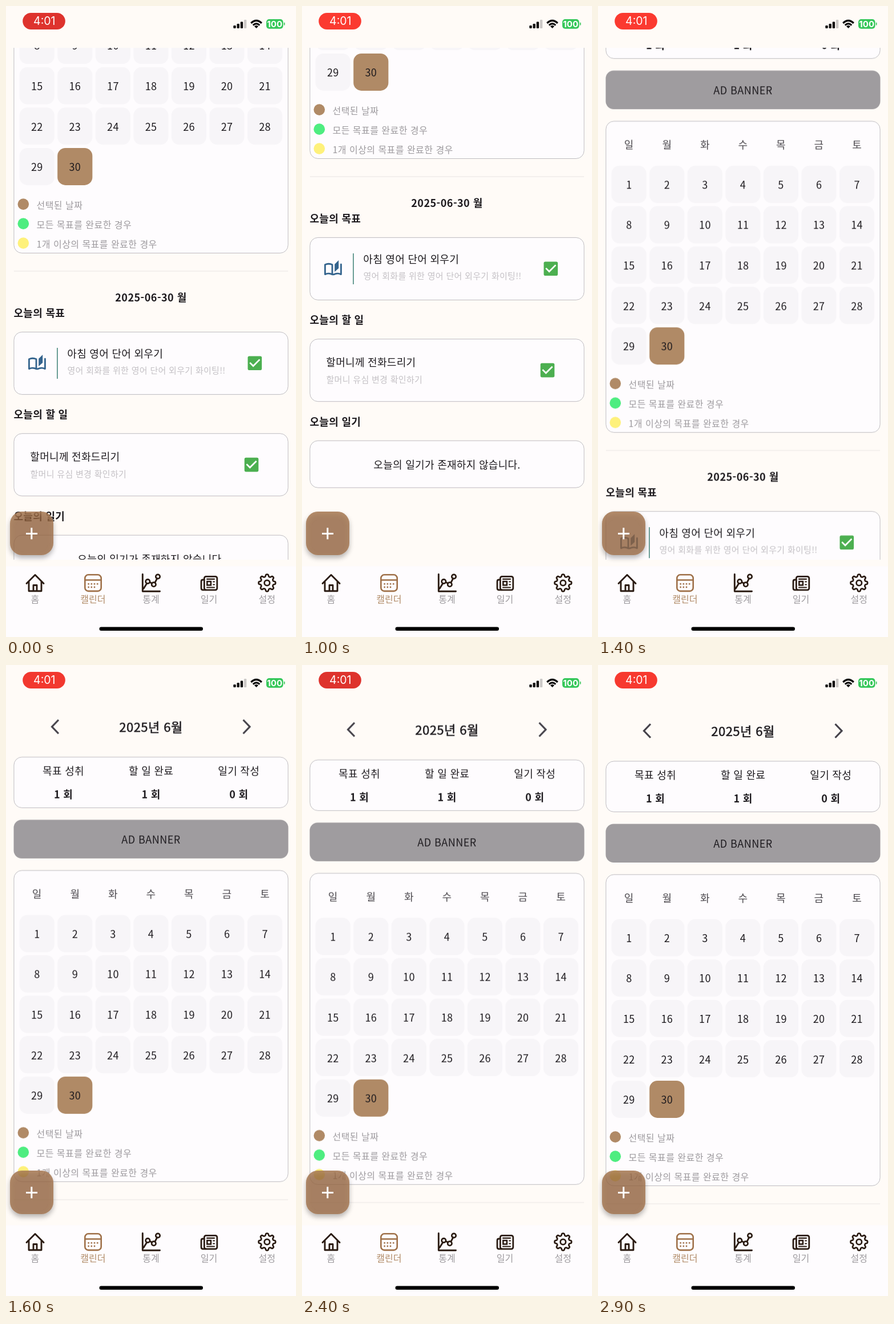
An HTML page that plays this animation: 508x1102 px, repeating every 3000 ms.

```html
<!DOCTYPE html>
<html lang="ko">
<head>
<meta charset="utf-8">
<title>Calendar</title>
<style>
  html, body { margin: 0; width: 100%; height: 100%; overflow: hidden; background: #fffbf7; }
  svg { display: block; width: 508px; height: 1102px; }
  text { font-family: "Noto Sans CJK KR", "Noto Sans CJK", sans-serif; white-space: pre; }
  .status { font-family: Inter, sans-serif; fill: #fff; }
  .fab { position: absolute; left: 7px; top: 883px; width: 76px; height: 76px; border-radius: 21px;
    background: rgba(144, 97, 60, .8);
    box-shadow: 0 5px 9px rgba(0, 0, 0, .28), inset 0 4px 9px rgba(190, 149, 112, .6); }
  .fab::before, .fab::after { content: ""; position: absolute; left: 28px; top: 37px;
    width: 20px; height: 2.6px; background: #fff; }
  .fab::after { transform: rotate(90deg); }
</style>
</head>
<body>
<svg viewBox="0 0 508 1102">
  <defs><clipPath id="view"><rect y="73" width="508" height="893.5"/></clipPath></defs>
  <rect width="508" height="1102" fill="#fffbf7"/>
  <g clip-path="url(#view)"><g id="page"></g></g>
  <g id="chrome"></g>
</svg>
<div class="fab"></div>
<script>
const DURATION = 3000, STEP = 100;
const INK = '#1d1a1e', MUTED = '#9d9a9e', FAINT = '#c4c1c5', BROWN = '#b08a66', CARD = '#fefcfe';
const page = document.getElementById('page');
const chrome = document.getElementById('chrome');

function add(parent, tag, attrs, content) {
  const el = document.createElementNS('http://www.w3.org/2000/svg', tag);
  for (const key in attrs) el.setAttribute(key, attrs[key]);
  if (content !== undefined) el.textContent = content;
  parent.append(el);
  return el;
}
const box = (parent, x, y, width, height, rx, fill, extra) =>
  add(parent, 'rect', { x, y, width, height, rx, fill, ...extra });
const line = (parent, d, stroke, width = 3, extra) =>
  add(parent, 'path', { d, stroke, 'stroke-width': width, fill: 'none',
    'stroke-linejoin': 'round', 'stroke-linecap': 'round', ...extra });
const dot = (parent, cx, cy, r, extra) => add(parent, 'circle', { cx, cy, r, ...extra });

// y is the optical middle of the line
const label = (parent, x, y, str, size, fill, extra) =>
  add(parent, 'text', { x, y: y + size * 0.37, 'font-size': size, fill, 'letter-spacing': 0.3, ...extra }, str);
const MID = { 'text-anchor': 'middle' };
const BOLD = { 'font-weight': 700 };
const LOOSE = { 'letter-spacing': 0.46 };
const card = (y, height) =>
  box(page, 13.9, y, 480.2, height, 14, CARD, { stroke: '#bebcc0', 'stroke-width': 1 });

function checkbox(x, y) {
  box(page, x - 12.3, y - 12.3, 24.6, 24.6, 2.7, '#4caf50');
  add(page, 'path', { d: 'M-7 0L-5.6 -1.4L-2 2.2L5.6 -5.4L7 -4L-2 5Z', fill: '#fff',
    transform: `translate(${x} ${y}) scale(1.365)` });
}

function drawSummary() {
  line(page, 'M92 95.5L80.5 107.5L92 119.5M415.5 95.5L427 107.5L415.5 119.5', '#45424a', 3.2,
    { 'stroke-linecap': 'butt', 'stroke-linejoin': 'miter' });
  label(page, 254, 108.5, '2025년 6월', 22, INK, { ...MID, ...LOOSE, stroke: INK, 'stroke-width': .5 });
  card(160.5, 88.5);
  [['목표 성취', 1], ['할 일 완료', 1], ['일기 작성', 0]].forEach(([name, count], i) => {
    const x = 100.5 + i * 153.6;
    label(page, x, 185.3, name, 18, INK, MID);
    label(page, x, 226, count + ' 회', 18, INK, { ...MID, ...BOLD });
  });
  box(page, 13.5, 270, 481, 67.5, 14, '#9f9c9f');
  label(page, 254, 304.8, 'AD BANNER', 18, INK, { ...MID, ...LOOSE });
}

function drawCalendar() {
  const pitch = 66.55;
  card(358.5, 543.5);
  [...'일월화수목금토'].forEach((day, i) => label(page, 54.3 + i * pitch, 400.3, day, 18, '#4b484d', MID));
  for (let day = 1; day <= 30; day++) {
    const x = 54.3 + (day - 1) % 7 * pitch;
    const y = 469.6 + Math.floor((day - 1) / 7) * 70.52;
    box(page, x - 30.7, y - 33.3, 61.2, 65, 14, day === 30 ? BROWN : '#f7f5f8');
    label(page, x, y + .2, day, 18, INK, MID);
  }
  [['선택된 날짜', BROWN], ['모든 목표를 완료한 경우', '#4eed80'], ['1개 이상의 목표를 완료한 경우', '#fef17b']]
    .forEach(([name, fill], i) => {
      dot(page, 30.3, 816.6 + i * 34, 9.8, { fill });
      label(page, 53.5, 818.3 + i * 34, name, 16, MUTED, LOOSE);
    });
  box(page, 14, 933, 480, 1, 0, '#e9e6e4');
}

function drawDay() {
  label(page, 254, 979.8, '2025-06-30 월', 18, INK, { ...MID, ...BOLD, ...LOOSE });
  [['목표', 1007], ['할 일', 1184.2], ['일기', 1361.7]].forEach(([name, y]) =>
    label(page, 13.5, y, '오늘의 ' + name, 18, INK, BOLD));

  card(1039.9, 109);
  const book = add(page, 'g', { transform: 'translate(37.6 1078.8) scale(1.4)', fill: '#33638d' });
  line(book, 'M2 17.6V6.1Q6.5 3.8 11 6.1V18.2Q6.5 15.8 2 18.1ZM11 18.2H13Q17.5 15.8 22 18.1V5.6', '#33638d', 2);
  add(book, 'path', { d: 'M19 .5L14 5.5V15L19 10.5Z' });
  box(page, 89, 1067.5, 1.8, 54, 0, '#5a938a');
  label(page, 107.3, 1077.6, '아침 영어 단어 외우기', 18, INK);
  label(page, 107.5, 1106.8, '영어 회화를 위한 영어 단어 외우기 화이팅!!', 15, FAINT);
  checkbox(435.8, 1094.3);

  card(1217.2, 109);
  label(page, 42.3, 1258.2, '할머니께 전화드리기', 18, INK);
  label(page, 42.5, 1287.8, '할머니 유심 변경 확인하기', 15, FAINT);
  checkbox(430, 1271.6);

  card(1394.7, 82);
  label(page, 254, 1436.7, '오늘의 일기가 존재하지 않습니다.', 18, INK, MID);
}

function drawStatusBar() {
  const pill = box(chrome, 29.2, 12, 74.6, 29, 14.5, '#df352e');
  add(chrome, 'text', { x: 67.3, y: 33.4, 'font-size': 19.5, class: 'status', 'text-anchor': 'middle' }, '4:01');
  [5, 8, 11.5, 15].forEach((h, i) =>
    box(chrome, 398.3 + i * 6.2, 39 - h, 4.4, h, 1.3, i < 3 ? '#0b0a0a' : '#cbc8c6'));
  const butt = { 'stroke-linecap': 'butt' };
  line(chrome, 'M429.2 30Q438.5 21 447.8 30', '#0b0a0a', 3.2, butt);
  line(chrome, 'M432.7 33.6Q438.5 28.2 444.3 33.6', '#0b0a0a', 3, butt);
  add(chrome, 'path', { d: 'M438.5 39L435 35.5Q438.5 32.6 442 35.5Z', fill: '#0b0a0a' });
  box(chrome, 456, 23, 29.5, 16.7, 5, '#35c759');
  box(chrome, 486.8, 28.8, 1.7, 5, 1, '#35c759');
  add(chrome, 'text', { x: 470.7, y: 36.8, 'font-size': 15, class: 'status', 'text-anchor': 'middle', 'font-weight': 700 }, '100');
  return pill;
}

function drawNav() {
  const dark = '#2b1c13', active = '#9f7048';
  box(chrome, 0, 978.5, 508, 123.5, 0, CARD);
  ['홈', '캘린더', '통계', '일기', '설정'].forEach((name, i) =>
    label(chrome, 50.8 + i * 101.6, 1036, name, 16, i === 1 ? BROWN : MUTED, { ...MID, 'letter-spacing': 0 }));

  // home
  line(chrome, 'M36 1008.5L51 993.5L66 1008.5M40 1005V1021.7H62V1005M48 1021V1011.5H54V1021', dark, 2.9);

  // calendar
  box(chrome, 138.3, 993.3, 28.4, 28.6, 6, 'none', { stroke: active, 'stroke-width': 2.6 });
  line(chrome, 'M138.5 1002.5H166.5', active, 2.4);
  for (let i = 0; i < 7; i++)
    dot(chrome, i < 4 ? 144.6 + i * 5.2 : 144.6 + (i - 4) * 5.2, i < 4 ? 1009.3 : 1015, 1.4, { fill: active });

  // chart
  line(chrome, 'M239.3 992.5V1022.3H269.5M241 1017.5L246 1009.5M252.2 1006.5L255.5 1008.2M261 1006.8L264.6 999.8', dark, 2.9);
  [[248.3, 1005], [258.8, 1010.3], [266, 996.5]].forEach(([x, y]) =>
    dot(chrome, x, y, 3.7, { fill: 'none', stroke: dark, 'stroke-width': 2.7 }));

  // newspaper
  box(chrome, 347.3, 996.4, 22.5, 23.4, 3, 'none', { stroke: dark, 'stroke-width': 2.8 });
  line(chrome, 'M347 1002H345Q342 1002 342 1005V1016.5Q342 1019.8 345 1019.8H350', dark, 2.8);
  box(chrome, 352.3, 1005, 6.6, 6.4, 0, 'none', { stroke: dark, 'stroke-width': 2.6 });
  line(chrome, 'M352 1000.8H365M363.2 1005.5H365M363.2 1010.5H365M352 1015.5H365', dark, 2.2);

  // gear
  const points = [];
  for (let i = 0; i < 96; i++) {
    const a = i / 96 * Math.PI * 2;
    const r = 13 + 1.9 * Math.tanh(2 * Math.cos(8 * a));
    points.push(`${(457.3 + r * Math.cos(a)).toFixed(2)} ${(1007.5 + r * Math.sin(a)).toFixed(2)}`);
  }
  line(chrome, `M${points.join('L')}Z`, dark, 2.7);
  dot(chrome, 457.3, 1007.5, 4.7, { fill: 'none', stroke: dark, 'stroke-width': 2.7 });

  box(chrome, 163.5, 1084.6, 181.5, 6.4, 3.2, '#000');
}

drawSummary();
drawCalendar();
drawDay();
const pill = drawStatusBar();
drawNav();

// [time, scroll offset], held until the next entry
const scroll = [
  [0, -470.5], [700, -486], [800, -550], [900, -614], [1000, -635.5], [1200, -610],
  [1300, -400], [1400, -157.3], [1500, -32], [1600, .3], [1700, 0],
  [2100, .8], [2200, 2.5], [2300, 4], [2400, 5.2], [2500, 6], [2600, 6.6],
  [2700, 7], [2800, 7.3], [2900, 7.5], [DURATION, 7.5]
];
const play = (el, frames) => el.animate(frames, { duration: DURATION, iterations: Infinity });

play(page, scroll.map(([time, y]) =>
  ({ offset: time / DURATION, transform: `translateY(${y}px)`, easing: 'step-end' })));

// recording indicator breathes with a two second period
play(pill, Array.from({ length: DURATION / STEP + 1 }, (_, i) => {
  const glow = .5 - .5 * Math.cos(Math.PI * (i * STEP - 200) / 1000);
  const mix = (from, to) => Math.round(from + (to - from) * glow);
  return { offset: i * STEP / DURATION, easing: 'step-end',
    fill: `rgb(${mix(218, 255)}, ${mix(50, 59)}, ${mix(45, 48)})` };
}));
</script>
</body>
</html>
```
